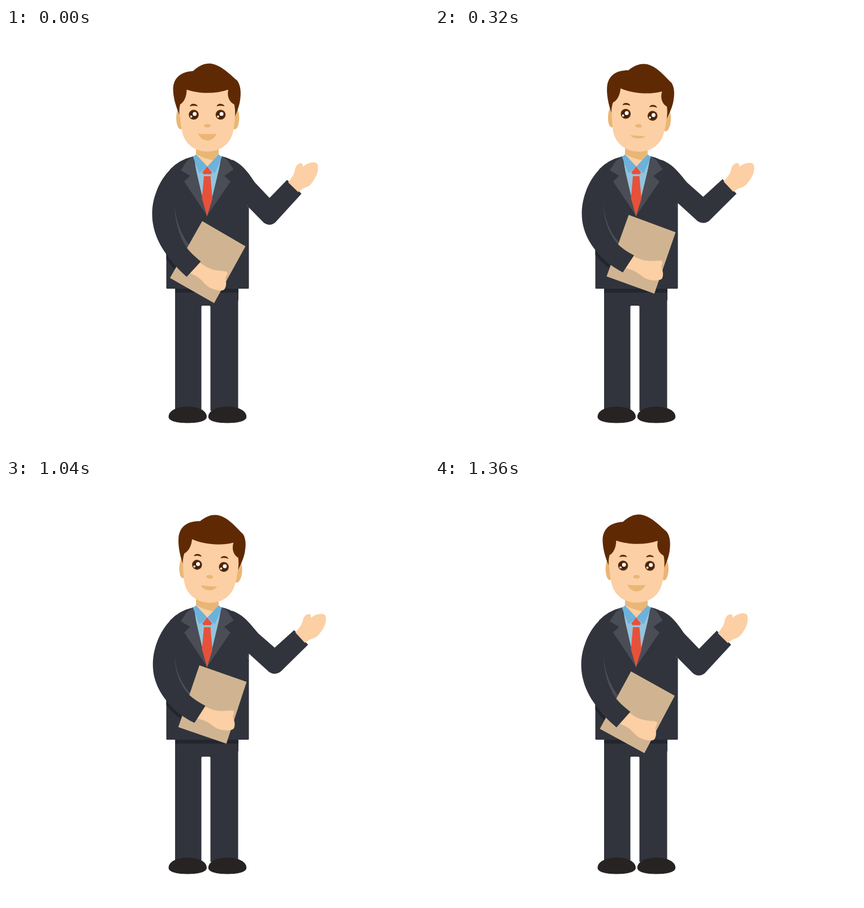
Write an HTML page that moves like this. It is 748 px wide and 748 px high and loops after 1.4 s.

```html
<!DOCTYPE html>
<html lang="en">
<head>
<meta charset="utf-8">
<title>Presenter</title>
<style>
  html, body { margin: 0; width: 100%; height: 100%; overflow: hidden; background: #fff; }
  svg { display: block; width: 100vw; height: 100vh; }
  .suit { fill: #31343c; }
  .dark { fill: #23262e; }
  .lapel { fill: #4a4d56; }
  .skin { fill: #fccfa4; }
  .shade { fill: #eab676; }
  .hair { fill: #5f2a03; }
  .red { fill: #e7513a; }
  .shoe { fill: #272322; }
</style>
</head>
<body>
<svg viewBox="0 0 748 748">
  <defs>
    <clipPath id="torso"><path d="M283.5 300H429.5V461H283.5Z"/></clipPath>
    <g id="eye">
      <circle r="8.8" fill="#5c2c08"/>
      <circle r="6.4" fill="#43200a"/>
      <circle cx="1.6" cy="-1.4" r="3.5" fill="#fff"/>
      <circle cx="-4.4" cy="3.3" r="1.9" fill="#fff"/>
    </g>
    <path id="brow" class="hair" d="M-7 3.5C-5.5 -.5 -2 -1.2 1 -.8C4 -.5 6 1 7 3.5C2 2 -2 2 -7 3.5Z"/>
    <path id="shoe" class="shoe" d="M-33.7 1C-33.7 -10 -19 -17 0 -17S33.7 -10 33.7 1C33.7 9 18 12 0 12S-33.7 9 -33.7 1Z"/>
  </defs>

  <path class="suit" d="M299 455H411V481L410.5 482V677H361.5V493Q361.5 491 359.5 491H347.5Q345.5 491 345.5 493V677H299Z"/>
  <path class="dark" d="M299 460H411V468H299Z"/>
  <use href="#shoe" x="321.2" y="686.5"/>
  <use href="#shoe" x="391.5" y="686.5"/>

  <path class="suit" d="M331 227L382 227C400 231 412 240 418 250L429.5 290V459.500Q429.5 461 428 461H285Q283.500 461 283.500 459.500V300L290 250Q306 233 331 227Z"/>
  <path class="suit" id="armR"/>
  <path class="lapel" d="M424 311Q429 313 429.5 323Q428 316 424 311Z"/>
  <path class="skin" id="palm" d="M499 273C505 265 510 258 511 251C512 244 516 239.500 521 239.200C525 239 525 242 525 245.500C531 240 538 237.500 544 237.500C551 237.500 552 242 551.500 250C551 259 546 267 540 275C535 281 530 282 525 284L516.500 290Z"/>

  <path fill="#93c4dc" d="M332 226L356 246L381 226L370 290L355.500 333L342 290Z"/>
  <path class="skin" d="M336 210H376V224L356 246L336 224Z"/>
  <path class="shade" d="M336 210H376V224L367 234Q350 231 336 223Z"/>
  <path fill="#6cb2db" d="M336 223.500L356 245L342 257L330.500 228Z"/>
  <path fill="#6cb2db" d="M376 223.500L356 245L369 257L382 228Z"/>
  <path class="lapel" d="M330.500 227L319.500 235.500L309 251.500L325.500 261.500L315 271.500L355.500 332L346 294Z"/>
  <path class="lapel" d="M382 227L391.500 233.500L402.500 250L386 261.500L397 271.500L355.500 332L366 294Z"/>
  <path class="red" d="M355.700 245L364.500 255.500L362 258.500H349.500L347 255.500Z"/>
  <path class="red" d="M350 262H361.500L365 302L355.500 332.500L346.500 301Z"/>

  <g clip-path="url(#torso)"><path class="dark" id="shadow" transform="translate(-2 6)"/></g>
  <path class="lapel" id="fold"/>
  <g id="hold">
    <path fill="#d0b492" d="M347 341.500L423.500 386L368 486.500L290 442Z"/>
    <path class="skin" d="M341 413C350 421 361 427 372 428.500C381 430 390 429.500 391.500 432.500C392.500 436 389 439 388 442C390 450 390 457 386 462.500C382 466 371 464 362 460C353 456 348 447 341 442C335 437 329 435 324 433Z"/>
  </g>
  <path class="suit" id="armL"/>

  <g id="head">
    <ellipse class="shade" cx="309" cy="159" rx="8" ry="20"/>
    <ellipse class="shade" cx="404.500" cy="159" rx="8" ry="20"/>
    <path class="skin" d="M307 145V120L320 98H393L405 120V145C405 158 404 170 402 181C398 205 379 218.500 356 218.500C334 218.500 315 205 311 181C309 170 307 158 307 145Z"/>
    <path class="hair" d="M306.500 153C300 138 295.500 122 295.500 108C296 88 309 77.500 331 76C343 65 353 62 363 63C381 66 396 82 409 93C415 102 415.500 113 414.500 123C413.500 136 409 146 405 156.500C405.500 148 405 141 403.500 135C395 131 390.500 121 393 109C370 117 341 116.500 319.500 109C319.500 121 315 131 308 135C306.500 141 306 147 306.500 153Z"/>
    <use href="#brow" x="332" y="135"/>
    <use href="#brow" x="379.500" y="135"/>
    <use href="#eye" class="lid" data-x="332"/>
    <use href="#eye" class="lid" data-x="379.500"/>
    <path class="shade" d="M350 173C351 168.500 361 168.500 362 173C361 177 351 177 350 173Z"/>
    <path class="shade" id="mouth" d="M-16.300 -5.500Q0 -4.500 16.300 -5.500C9 10.500 -9 10.500 -16.300 -5.500Z"/>
  </g>
</svg>
<script>
const LOOP = 1400, STEP = 40, SWING = 500;
const $ = id => document.getElementById(id);
const lids = document.querySelectorAll('.lid');

// Each pair holds the path at rest and at full swing.
const armR = [
  'M400 233C418 241 428 255 440 273L466 300.5L497 268.5L522.5 293L476 344Q466 351.5 456 344.5L428 316L400 300Z',
  'M400 233C422 241 432 256 447 273L476.5 298L511.5 267L536 293L488 339.5Q478 347.5 467 341L430 308L400 300Z'
];
const armL = [
  'M300 242C284 254 272 272 266 289C257 312 257 334 261 352C265 370 273 386 285 402C294 415 305 427 319.5 440L344.5 413C334 404 326 397 320 389C305 367 298 340 297.5 307Z',
  'M300 242C284 254 273 272 267 289C258.500 312 258.500 334 262.500 350C266 364 273 378 284 391C297 408 315 421 335.500 430L354 399C342 394 333 388 325 381C307 363 298 340 297.5 307Z'
];
const fold = [
  'M297.500 306C298 340 305 367 320 390L324 384C308 363 299 337 297.500 306Z',
  'M297.500 306C298 340 307 363 325 382L327 379C309 361 299 337 297.500 306Z'
];

const clamp = x => Math.max(0, Math.min(1, x));

function mix([a, b], p) {
  const num = /-?\d+(\.\d+)?/g, ends = b.match(num);
  let i = 0;
  return a.replace(num, v => (+v + (ends[i++] - v) * p).toFixed(2));
}

function draw(t) {
  const u = clamp(Math.min(t, LOOP - t) / SWING);
  const p = u + u * u - u * u * u;
  const set = (id, name, value) => $(id).setAttribute(name, value);

  const sleeve = mix(armL, p);
  set('armL', 'd', sleeve);
  set('shadow', 'd', sleeve);
  set('fold', 'd', mix(fold, p));
  set('armR', 'd', mix(armR, p));
  set('hold', 'transform', `rotate(${-12.4 * p} 280 362)`);
  set('palm', 'transform', `translate(${14.2 * p} ${-p}) rotate(${3.5 * p} 509.5 281)`);
  set('head', 'transform', `rotate(${5.4 * p} 355 224)`);

  // The mouth opens three times per loop.
  const open = (1 + Math.cos(t / LOOP * 6 * Math.PI)) / 2;
  set('mouth', 'transform', `translate(356 192.5) scale(${0.75 + 0.25 * open} ${0.12 + 0.88 * open})`);

  const near = clamp(Math.abs(t - LOOP / 2) / 220);
  const blink = 1 - 0.9 * (1 + Math.cos(Math.PI * near)) / 2;
  lids.forEach(e => e.setAttribute('transform', `translate(${e.dataset.x} 153.3) scale(1 ${blink})`));
}

const start = performance.now();
function tick() {
  const t = (performance.now() - start) % LOOP;
  draw(Math.floor(t / STEP) * STEP);
  requestAnimationFrame(tick);
}
tick();
</script>
</body>
</html>
```
